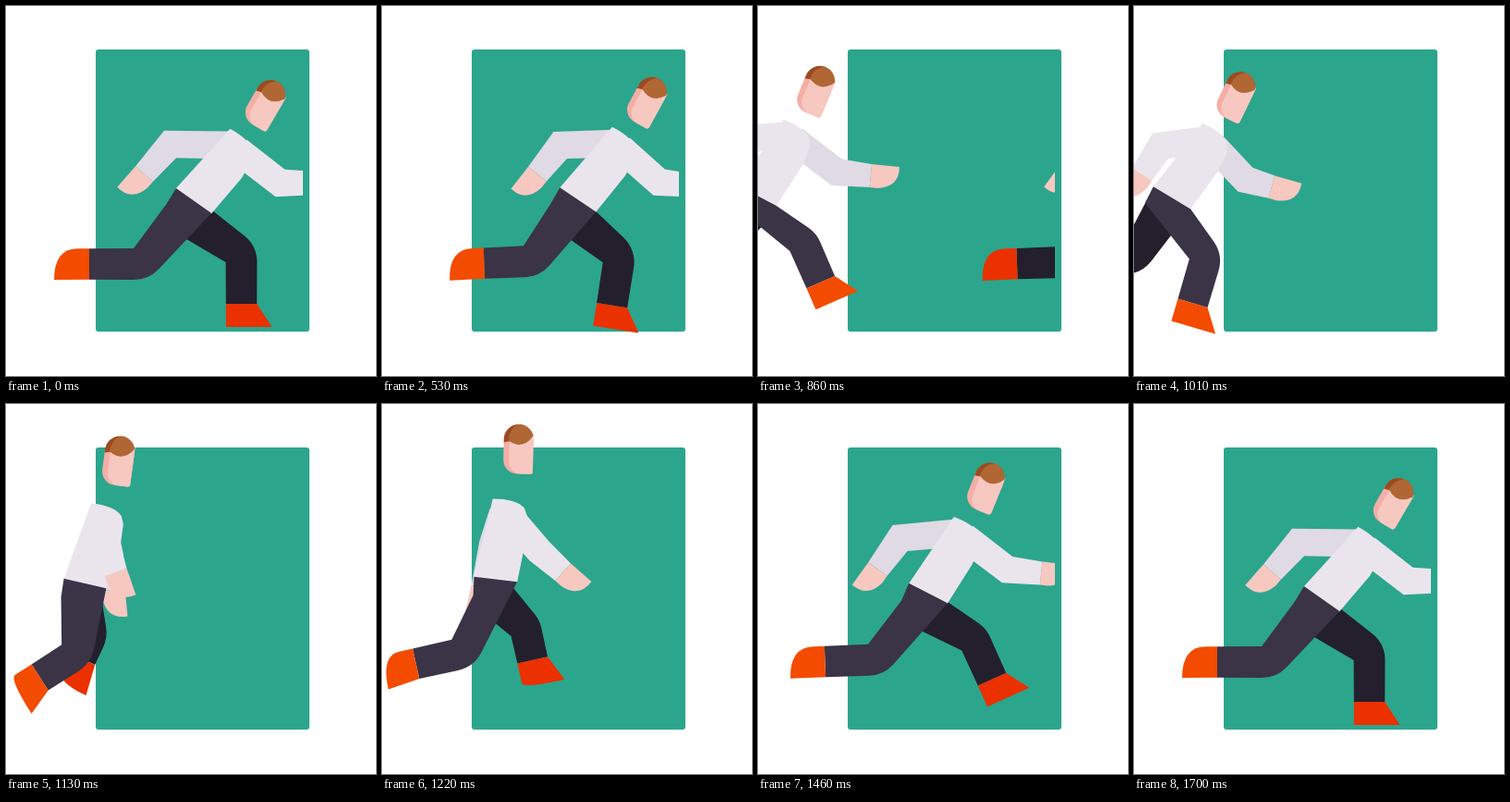
An HTML page with a canvas that plays this animation: 400x400 px, repeating every 1.73 s.

```html
<!DOCTYPE html>
<html>
<head>
<meta charset="utf-8">
<style>
html, body { margin: 0; width: 100%; height: 100%; overflow: hidden; background: #fff; }
canvas { display: block; width: 400px; height: 400px; }
</style>
</head>
<body>
<canvas id="stage" width="400" height="400"></canvas>
<script>
const ctx = document.getElementById('stage').getContext('2d');
const LOOP = 1730, HOLD = 530, STEP = 30, END = 1700;
const SKIN = '#f6c8c0';
const NEAR = { sleeve: '#eae5ec', leg: '#3a3446', shoe: '#f34b00' };
const FAR = { sleeve: '#e0dae5', leg: '#241f2c', shoe: '#eb3100' };

// One stride, relative to the hip: phase, then the two joints of the limb.
// Both sides share it, half a stride apart.
const ARM = [
  [0, 93.5, -19, 130, -19],
  [.25, -4, -38, -15, 9],
  [.41, -30.5, -59.5, -54.5, -26],
  [.5, -25.5, -61, -53.5, -29],
  [.75, 48, -30.5, 74, -8],
  [.91, 85.5, -25.5, 122, -21.5]
];
const LEG = [
  [0, -57, 68.5, -113, 68.5],
  [.25, 33, 53, 41, 87.5],
  [.41, 49.5, 50, 69, 93],
  [.5, 51.5, 57.5, 51.5, 111.5],
  [.75, -36, 80, -87, 91],
  [.91, -56.5, 72, -111.5, 74]
];

// Smooth closed curve through the key points; returns both joints
function stride(keys, phase) {
  const p = phase % 1, n = keys.length;
  const i = keys.filter(k => k[0] <= p).length - 1;
  const [a, b, c, d] = [i - 1, i, i + 1, i + 2].map(j => {
    const [at, ...joints] = keys[(j + n) % n];
    return [at + Math.floor(j / n), ...joints];
  });
  const h = c[0] - b[0], u = (p - b[0]) / h, v = 1 - u;
  const slope = (q, r, s, j) => {
    const h0 = r[0] - q[0], h1 = s[0] - r[0];
    return ((r[j] - q[j]) / h0 * h1 + (s[j] - r[j]) / h1 * h0) / (h0 + h1);
  };
  const [x1, y1, x2, y2] = [1, 2, 3, 4].map(j =>
    b[j] * v * v * (1 + 2 * u) + c[j] * u * u * (3 - 2 * u) +
    h * u * v * (slope(a, b, c, j) * v - slope(b, c, d, j) * u));
  return [[x1, y1], [x2, y2]];
}

function fill(color, draw) {
  ctx.fillStyle = color;
  ctx.beginPath();
  draw();
  ctx.closePath();
  ctx.fill();
}

function unit(a, b) {
  const dx = b[0] - a[0], dy = b[1] - a[1], len = Math.hypot(dx, dy) || 1;
  return [dx / len, dy / len];
}
const side = (p, n, w) => [p[0] + n[0] * w, p[1] + n[1] * w];
const normal = d => [-d[1], d[0]];

// Two-part limb with a mitred joint, its outer corner rounded by radius.
// The half widths are those of root, joint and end.
function limb(color, root, joint, end, [w0, w1, w2], radius, edge) {
  const n1 = normal(unit(root, joint)), n2 = normal(unit(joint, end));
  const k = 1 / Math.max(.4, 1 + n1[0] * n2[0] + n1[1] * n2[1]);
  const mitre = [(n1[0] + n2[0]) * k, (n1[1] + n2[1]) * k];
  const start = edge || [side(root, n1, -w0), side(root, n1, w0)];
  fill(color, () => {
    start.forEach(p => ctx.lineTo(...p));
    ctx.lineTo(...side(joint, mitre, w1));
    ctx.lineTo(...side(end, n2, w2));
    ctx.lineTo(...side(end, n2, -w2));
    ctx.arcTo(...side(joint, mitre, -w1), ...start[0], radius);
  });
}

// Draws in a frame whose y axis continues the line from a to b
function beyond(a, b, draw) {
  const d = unit(a, b);
  ctx.save();
  ctx.translate(...b);
  ctx.rotate(Math.atan2(d[1], d[0]) - Math.PI / 2);
  draw();
  ctx.restore();
}

function arm(look, local, phase) {
  const [elbow, wrist] = stride(ARM, phase);
  limb(look.sleeve, local(elbow[0] / 12, -72), elbow, wrist, [15, 14.7, 12.6], 0);
  beyond(elbow, wrist, () => {
    if (wrist[0] < 20) ctx.scale(-1, 1);
    fill(SKIN, () => {
      ctx.moveTo(-12.6, 0);
      ctx.lineTo(12.6, 0);
      ctx.lineTo(12.6, 30);
      ctx.quadraticCurveTo(-9, 32, -12.6, 9);
    });
  });
}

function leg(look, root, phase, edge) {
  const [knee, ankle] = stride(LEG, phase), a = phase * 2 * Math.PI;
  // 0: foot flat on the ground, 1: toes pointing back
  const point = Math.min(1, Math.max(0, .5 + Math.cos(a) - .3 * Math.sin(a)));
  limb(look.leg, root, knee, ankle, [22, 17, 16.7], 37, edge);
  beyond(knee, ankle, () => fill(look.shoe, () => {
    ctx.moveTo(16.7, 0);
    ctx.lineTo(-16.7, 0);
    ctx.lineTo(-16.7, 25 - 13 * point);
    ctx.quadraticCurveTo(-16.7, 25 + 13 * point, 33 - 16 * point, 25 + 13 * point);
  }));
}

function head(x, y, tilt) {
  ctx.save();
  ctx.translate(x, y);
  ctx.rotate(tilt);
  fill('#f4aea6', () => ctx.roundRect(-16, 0, 32, 37.5, [0, 0, 3, 15]));
  fill(SKIN, () => ctx.roundRect(-10, -6, 26, 43.5, [0, 0, 3, 13]));
  fill('#9d4a20', () => {
    ctx.arc(0, 0, 16, Math.PI, -.25);
    ctx.lineTo(-8, 2);
    ctx.lineTo(-16, 4);
  });
  fill('#b06734', () => {
    ctx.moveTo(-11, 2);
    ctx.quadraticCurveTo(-10, -12, -1, -16);
    ctx.arc(0, 0, 16, -1.63, -.25);
    ctx.quadraticCurveTo(5, 12, -11, 2);
  });
  ctx.restore();
}

// The body sinks and leans twice per stride
function runner(x, phase) {
  const a = phase * 4 * Math.PI, dip = Math.cos(a);
  const lean = (21 + 14.4 * dip) * Math.PI / 180;
  const c = Math.cos(lean), s = Math.sin(lean);
  const local = (u, v) => [u * c - v * s, u * s + v * c];
  ctx.save();
  ctx.translate(x - 11 * Math.sin(a) + 5 * (1 - dip), 200 + 10.5 * dip);
  arm(FAR, local, phase + .5);
  leg(FAR, local(0, 18), phase + .5);
  fill(NEAR.sleeve, () => {
    ctx.moveTo(...local(-23.5, 1));
    ctx.lineTo(...local(-13, -86));
    ctx.quadraticCurveTo(...local(12, -89), ...local(22, -80));
    ctx.lineTo(...local(26, -72));
    ctx.lineTo(...local(28, -50));
    ctx.lineTo(...local(23.5, 1));
  });
  leg(NEAR, [0, 0], phase, [local(23.5, 0), local(-23.5, 0), local(-22, 20)]);
  arm(NEAR, local, phase);
  head(54 + 29 * dip, -133 + 18.5 * dip, lean - .09);
  ctx.restore();
}

function frame(now) {
  const t = now % LOOP;
  const time = t < HOLD ? END : HOLD + STEP * Math.floor((t - HOLD) / STEP);
  const phase = 1 - ((END - time) / 1200) ** 1.5, left = 1 - phase;

  ctx.clearRect(0, 0, 400, 400);
  fill('#2ca58d', () => ctx.roundRect(97, 47, 231, 305, 3));

  // The runner vanishes behind the right frame of the door
  ctx.save();
  ctx.beginPath();
  [[0, 0], [308, 0], [308, 51], [321, 51], [321, 400], [0, 400]]
    .forEach(p => ctx.lineTo(...p));
  ctx.clip();
  runner(203 + 355 * phase + 1000 * phase ** 4, phase);
  runner(203 - 355 * left - 600 * left ** 8, phase);
  ctx.restore();
}

function tick() {
  frame(performance.now());
  requestAnimationFrame(tick);
}
tick();
</script>
</body>
</html>
```
